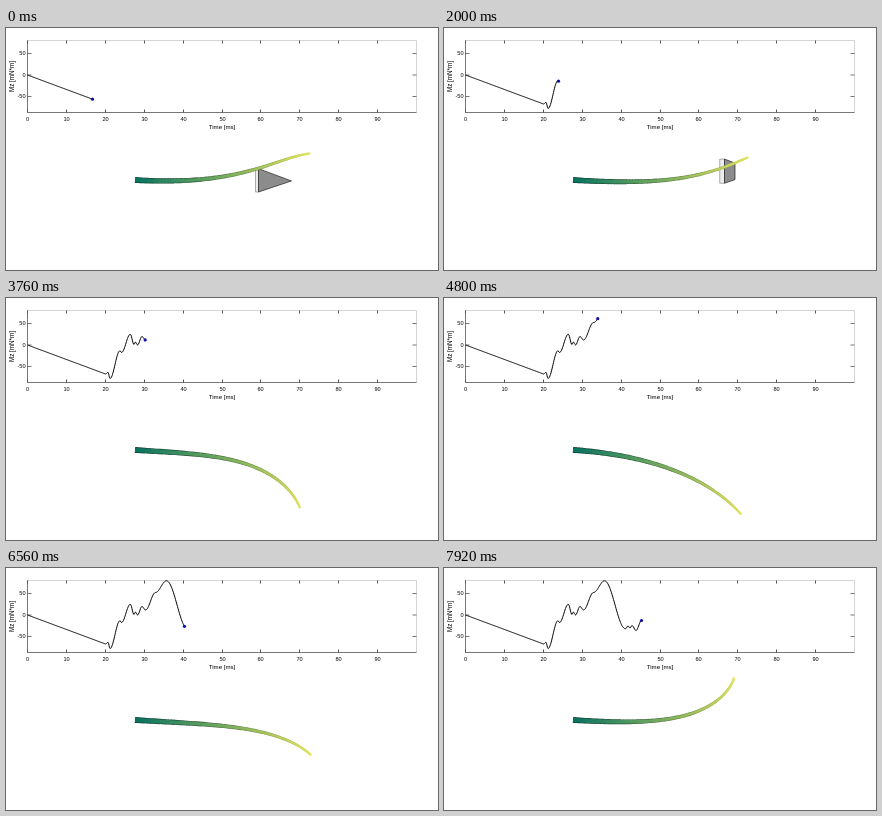
An HTML page with a canvas that plays this animation: 432 by 242 pixels, repeating every 8000 ms.

```html
<!DOCTYPE html>
<html>
<head>
<meta charset="utf-8">
<style>
  html, body { margin: 0; width: 100%; height: 100%; overflow: hidden; background: #fff; }
  canvas { display: block; }
</style>
</head>
<body>
<canvas id="stage" width="432" height="242"></canvas>
<script>
const g = document.getElementById('stage').getContext('2d');
const FRAME = 80, FRAMES = 100;
const LEFT = 21.5, RIGHT = 410.5, TOP = 12.5, BOTTOM = 84.5, ZERO = 47;
const INK = '#555', PALE = '#d4d4d4';

// Turning points of the moment curve after its straight ramp.
const turns = [
  [99.5, 76], [102, 74.3], [104, 80.5], [114, 52.7], [115.5, 54.5], [124.3, 36.3],
  [128, 46.5], [129.5, 44], [131.5, 47], [136, 38.5], [139.5, 42], [149.5, 24.5],
  [160.5, 12.8], [181.5, 60.8], [184, 58], [186, 60], [188, 57.5], [192, 62.5], [197.5, 52.5]
];

// Key poses of the beam: step, then the weights of s, s^3 and s^7 in its angle.
const poses = [
  [0, -20, -27, 37],
  [15, -24, -36, 48],
  [35, 5, -12, -22],
  [47, 0, 65, 0],
  [60, 25, 20, 0],
  [82, -2, 30, 11],
  [99, -8, -50, -18]
];

const mix = (a, b, u) => a + (b - a) * u;

function line(color, width, ...pts) {
  g.strokeStyle = color;
  g.lineWidth = width;
  g.beginPath();
  pts.forEach(([x, y]) => g.lineTo(x, y));
  g.stroke();
}

function shape(fill, stroke, pts) {
  g.fillStyle = fill;
  g.beginPath();
  pts.forEach(([x, y]) => g.lineTo(x, y));
  g.fill();
  line(stroke, 0.7, ...pts, pts[0]);
}

function text(str, x, y, size, align) {
  g.font = size + 'px "Liberation Sans", Arial, sans-serif';
  g.textAlign = align;
  g.textBaseline = 'middle';
  g.fillStyle = '#000';
  g.fillText(str, x, y);
}

function drawAxes() {
  line(PALE, 1, [LEFT, TOP], [RIGHT, TOP], [RIGHT, BOTTOM]);
  line('#777', 1, [LEFT, TOP], [LEFT, BOTTOM], [RIGHT, BOTTOM]);
  for (let i = 0; i < 10; i++) {
    const x = Math.round(i * 38.9) + LEFT;
    line(INK, 1, [x, BOTTOM], [x, BOTTOM - 3]);
    line(INK, 1, [x, TOP], [x, TOP + 3]);
    text(i * 10, x, 91, 5.6, 'center');
  }
  for (const v of [50, 0, -50]) {
    const y = ZERO - v * 0.43;
    line(INK, 0.8, [LEFT, y], [LEFT + 4, y]);
    line(INK, 0.8, [RIGHT, y], [RIGHT - 4, y]);
    text(v, 19.5, y, 5.6, 'right');
  }
  text('Time [ms]', 216, 99.3, 6.1, 'center');
  g.save();
  g.translate(6.5, 48.5);
  g.rotate(-Math.PI / 2);
  text('Mz [mN*m]', 0, 0, 6.3, 'center');
  g.restore();
}

function momentAt(x) {
  const [x0, y0] = turns[0];
  if (x <= x0) return mix(ZERO, y0, (x - LEFT) / (x0 - LEFT));
  const i = Math.max(1, turns.findIndex(p => p[0] >= x));
  const [xa, ya] = turns[i - 1], [xb, yb] = turns[i];
  return mix(ya, yb, (1 - Math.cos(Math.PI * (x - xa) / (xb - xa))) / 2);
}

function drawCurve(step) {
  const end = 86.5 + 1.121 * step, pts = [];
  for (let x = LEFT; x < end; x += 0.5) pts.push([x, momentAt(x)]);
  const tip = [end, momentAt(end)];
  g.lineJoin = 'round';
  line('#000', 1, ...pts, tip);
  g.fillStyle = '#1010a8';
  g.beginPath();
  g.arc(...tip, 1.6, 0, 7);
  g.fill();
}

// The wedge slides right and is cut off at the edge of the view.
function drawWedge(step) {
  const x = 252.5 + step * 1.12, edge = 291;
  if (x > edge - 2) return;
  const y = 140.7 - step * 0.385, low = 164 - step * 0.35, mid = (y + low) / 2 + 0.6;
  const w = 3 + step * 0.07, cut = Math.min(1, (edge - x) / 33), right = x + 33 * cut;
  shape('#ececec', '#888', [[x - w, y], [x, y], [x, low], [x - w, low]]);
  shape('#8c8c8c', '#222', [[x, y], [right, mix(y, mid, cut)], [right, mix(low, mid, cut)], [x, low]]);
}

function slope(i, k) {
  const a = poses[Math.max(i - 1, 0)], b = poses[Math.min(i + 1, poses.length - 1)];
  return (b[k] - a[k]) / (b[0] - a[0]);
}

// Smooth Hermite passage through the key poses.
function weightsAt(step) {
  const i = Math.max(1, poses.findIndex(p => p[0] >= step)) - 1;
  const a = poses[i], b = poses[i + 1], h = b[0] - a[0], u = (step - a[0]) / h, v = 1 - u;
  return [1, 2, 3].map(k =>
    a[k] * v * v * (1 + 2 * u) + b[k] * u * u * (3 - 2 * u) +
    h * u * v * (v * slope(i, k) - u * slope(i + 1, k)));
}

function beamPoints(step) {
  const [a, b, c] = weightsAt(step), n = 60;
  const len = 181 + 0.2 * (a / 2 + b / 4 + c / 8);
  const pts = [[129, 152]];
  for (let i = 0; i < n; i++) {
    const s = (i + 0.5) / n, [x, y] = pts[i];
    const angle = (3.5 + a * s + b * s ** 3 + c * s ** 7) * Math.PI / 180;
    pts.push([x + len / n * Math.cos(angle), y + len / n * Math.sin(angle)]);
  }
  return pts;
}

function drawBeam(step) {
  const pts = beamPoints(step), n = pts.length - 1;
  for (const [shade, inset] of [[0.5, 0], [0.92, 1.4]]) {
    for (let i = 0; i < n; i++) {
      const s = i / n, [x, y] = pts[i], [x2, y2] = pts[i + 1];
      const rgb = [10 + 245 * s, 125 + 130 * s, 104].map(c => Math.round(c * mix(shade, 0.9, s * s)));
      const over = i < n - 1 ? 0.15 : 0;
      line(`rgb(${rgb})`, mix(5.8, 2.2, s) - inset * (1 - 0.35 * s),
        [x, y], [mix(x2, x, -over), mix(y2, y, -over)]);
    }
  }
}

function draw(now) {
  const step = Math.floor(now / FRAME) % FRAMES;
  g.fillStyle = '#fff';
  g.fillRect(0, 0, 432, 242);
  drawAxes();
  drawCurve(step);
  drawWedge(step);
  drawBeam(step);
}

let start;
function tick(now) {
  start ??= now;
  draw(now - start);
  requestAnimationFrame(tick);
}
draw(0);
requestAnimationFrame(tick);
</script>
</body>
</html>
```
